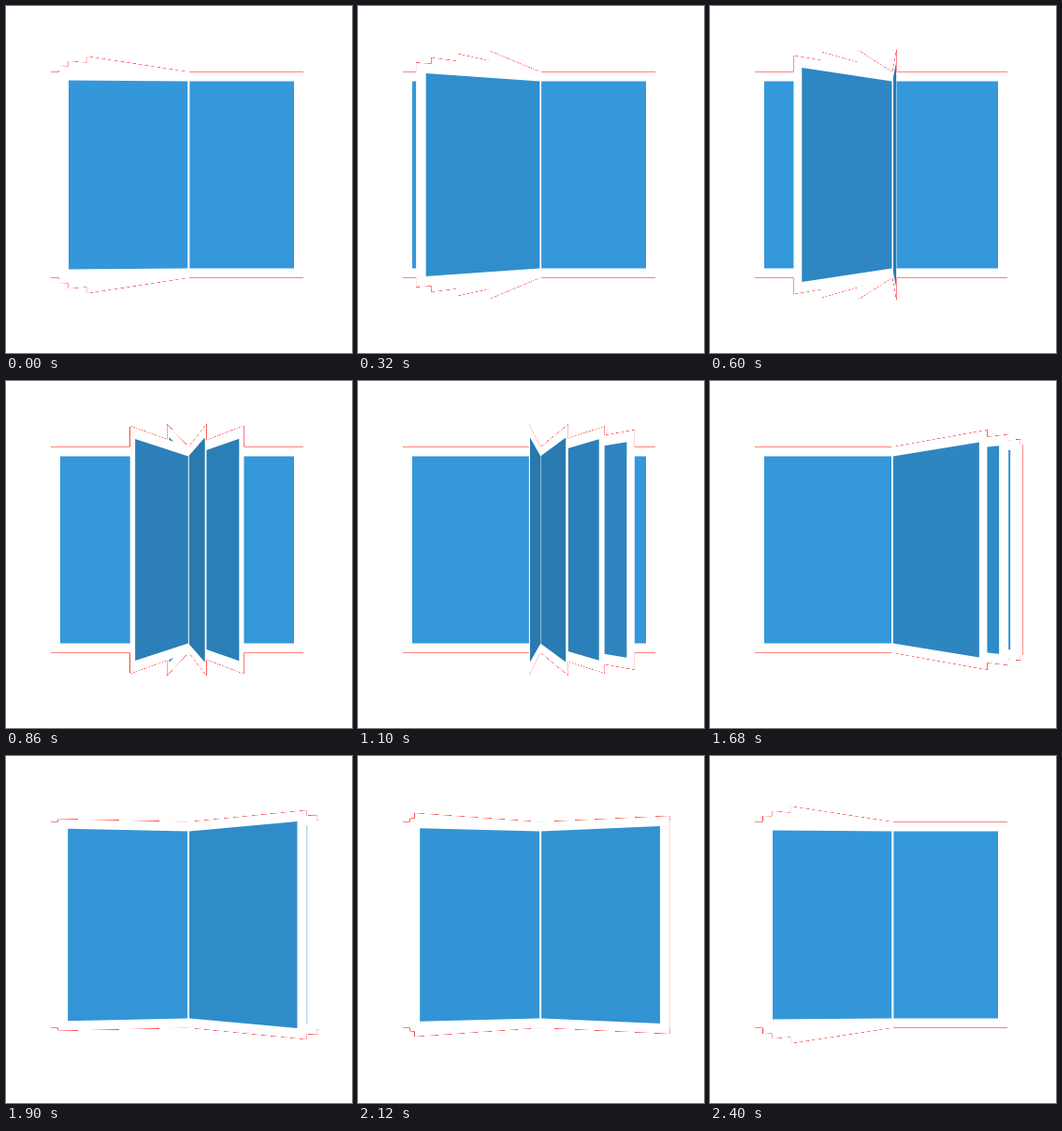
Recreate the animation shown at these times as an HTML page with a canvas. Size 370x371 px, loop 2420 ms.

```html
<!DOCTYPE html>
<html lang="en">
<head>
<meta charset="utf-8">
<title>Turning pages</title>
<style>
  html, body { margin: 0; width: 100%; height: 100%; overflow: hidden; background: #fff; }
  canvas { display: block; }
</style>
</head>
<body>
<canvas width="370" height="371"></canvas>
<script>
const canvas = document.querySelector('canvas');
const ctx = canvas.getContext('2d', { willReadFrequently: true });

const LOOP = 2420, TURN = 2400;
const HINGE = 195.2, MIDDLE = 180.5, DEPTH = 750;
const PAGE_WIDTH = 137.2, MARGIN = 10;
const PAGES = 4, GAP = 14.4, FIRST = 133.6;
const BLUE = [52, 152, 219], SHADE = 0.215;
const MIN_COVER = 0.25;

// A strip of a page, from `near` to `far` along its width, in perspective.
function strip(near, far, half, angle, color) {
  const project = (w, y) => {
    const scale = 1 / (1 - w * Math.sin(angle) / DEPTH);
    return [HINGE + w * Math.cos(angle) * scale, MIDDLE + y * scale];
  };
  ctx.fillStyle = color;
  ctx.beginPath();
  ctx.lineTo(...project(near, -half));
  ctx.lineTo(...project(far, -half));
  ctx.lineTo(...project(far, half));
  ctx.lineTo(...project(near, half));
  ctx.fill();
}

function drawPage(degrees) {
  const angle = degrees * Math.PI / 180;
  const light = 1 - SHADE * Math.min(degrees, 180 - degrees) / 90;
  strip(-1, PAGE_WIDTH, 110, angle, '#fff');
  strip(1, PAGE_WIDTH - MARGIN, 100, angle, `rgb(${BLUE.map(c => c * light)})`);
}

// Partly covered pixels along the silhouette blend into a red backing.
function reddenEdges() {
  const image = ctx.getImageData(0, 0, canvas.width, canvas.height);
  const px = image.data;
  for (let i = 0; i < px.length; i += 4) {
    const cover = px[i + 3] / 255;
    if (cover === 0 || cover === 1) continue;
    px[i] = 255;
    px[i + 1] = px[i + 2] = 255 * cover;
    px[i + 3] = cover < MIN_COVER ? 0 : 255;
  }
  ctx.putImageData(image, 0, 0);
}

function draw(now) {
  const turned = 180 * Math.min(now % LOOP, TURN) / TURN;
  ctx.clearRect(0, 0, canvas.width, canvas.height);
  ctx.fillStyle = '#fff';
  ctx.fillRect(48, 70.5, 270, 220);
  ctx.fillStyle = `rgb(${BLUE})`;
  ctx.fillRect(58, 80.5, 250, 200);
  for (let i = 0; i < PAGES; i++) {
    drawPage((FIRST + i * GAP - turned + 360) % 180);
  }
  reddenEdges();
  requestAnimationFrame(draw);
}
requestAnimationFrame(draw);
</script>
</body>
</html>
```
